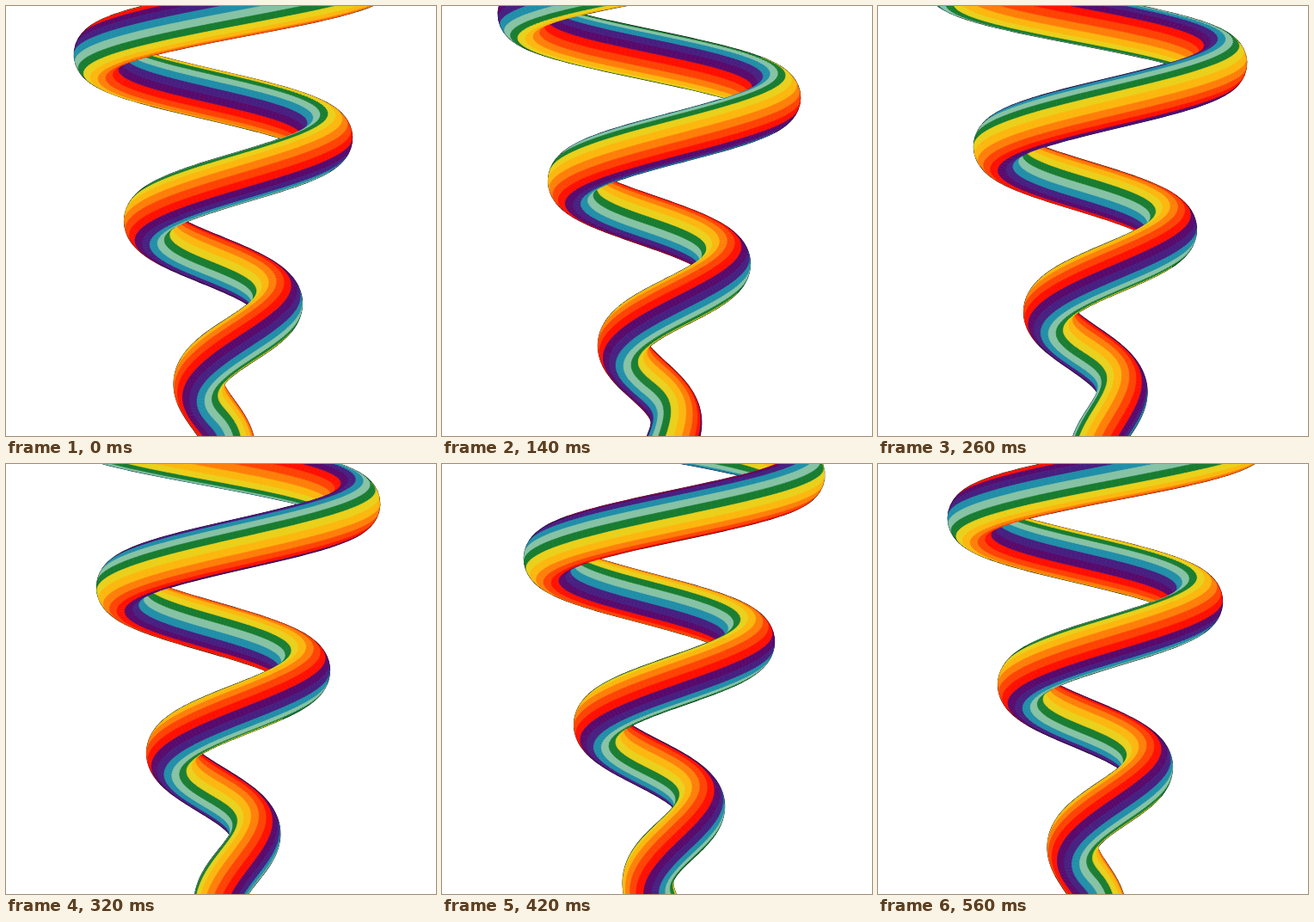
Recreate the animation shown at these times as an HTML page with a canvas. Size 500x500 px, loop 580 ms.

```html
<!DOCTYPE html>
<html lang="en">
<head>
<meta charset="utf-8">
<title>Rainbow spiral</title>
<style>
  html, body { margin: 0; height: 100%; overflow: hidden; background: #fff; }
  canvas { display: block; }
</style>
</head>
<body>
<canvas id="stage" width="500" height="500"></canvas>
<script>
const ctx = document.getElementById('stage').getContext('2d');
const COLORS = ['#ff0f00', '#580a6c', '#471f80', '#208ea8', '#86c2a4',
                '#177c30', '#ead01a', '#fcb70e', '#ff7e09', '#ff4204'];
const LOOP = 580, STEP = 20;
const CENTER = 255.5, APEX = 547.5, SLOPE = 0.3;   // cone the spiral winds on
const PITCH = 195, RISE = PITCH / (2 * Math.PI);
const TUBE = 29, HALF = 5;                         // HALF: stripes on half the tube
const STRIPE = Math.PI / 10;
const FRONT_Y = 204.5, TWIST = -10.8;

const clamp = (v, lo, hi) => Math.min(hi, Math.max(lo, v));
const cross = (a, b) => [
  a[1] * b[2] - a[2] * b[1],
  a[2] * b[0] - a[0] * b[2],
  a[0] * b[1] - a[1] * b[0]
];
const unit = v => {
  const n = Math.hypot(...v);
  return v.map(c => c / n);
};

// Cross-section of the tube at height y; z points to the viewer.
function makeRing(y, phase) {
  const turn = (FRONT_Y - PITCH * phase - y) / RISE;
  const s = Math.sin(turn), c = Math.cos(turn);
  const R = SLOPE * (APEX - y), grow = SLOPE * RISE;
  const T = unit([R * c + grow * s, -RISE, grow * c - R * s]);
  const along = s * T[0] + c * T[2];
  const N = unit([s - along * T[0], -along * T[1], c - along * T[2]]);
  const B = cross(N, T);
  // The stripes follow the tube without twisting and roll half a turn per loop.
  const outer = TWIST + Math.asinh(R / RISE) / SLOPE / STRIPE - 10 * phase;
  return {
    x: CENTER + R * s, y, z: R * c, N, B, outer,
    facing: Math.atan2(B[2], N[2])
  };
}

// Screen point on the ring at stripe coordinate u, kept to the visible half.
function pointAt(ring, u) {
  const mid = ring.outer + ring.facing / STRIPE;
  const a = (clamp(u, mid - HALF, mid + HALF) - ring.outer) * STRIPE;
  const ca = TUBE * Math.cos(a), sa = TUBE * Math.sin(a);
  return [ring.x + ca * ring.N[0] + sa * ring.B[0],
          ring.y + ca * ring.N[1] + sa * ring.B[1]];
}

function trace(points) {
  ctx.beginPath();
  points.forEach(p => ctx.lineTo(...p));
}

function drawSegment([a, b]) {
  const mids = [a, b].map(r => r.outer + r.facing / STRIPE);
  const last = Math.max(...mids) + HALF;
  for (let j = Math.floor(Math.min(...mids) - HALF); j < last; j++) {
    trace([pointAt(a, j), pointAt(a, j + 1), pointAt(b, j + 1), pointAt(b, j)]);
    ctx.closePath();
    ctx.fillStyle = ctx.strokeStyle = COLORS[((j % 10) + 10) % 10];
    ctx.fill();
    ctx.stroke();
  }
}

function draw(phase) {
  ctx.clearRect(0, 0, 500, 500);
  ctx.lineJoin = 'round';
  const rings = [];
  for (let y = 546; y > -60; y -= 1.5) {
    const ring = makeRing(y, phase), prev = rings[rings.length - 1];
    if (prev) {
      const full = 2 * Math.PI;
      ring.facing += full * Math.round((prev.facing - ring.facing) / full);
    }
    rings.push(ring);
  }

  // Hairline edge, left visible only against the background.
  ctx.strokeStyle = '#000';
  ctx.lineWidth = 1.7;
  for (const side of [-1e4, 1e4]) {
    trace(rings.map(r => pointAt(r, side)));
    ctx.stroke();
  }

  ctx.lineWidth = 0.7;
  rings.slice(1).map((r, i) => [rings[i], r])
    .sort((p, q) => p[0].z + p[1].z - q[0].z - q[1].z)
    .forEach(drawSegment);
}

const start = performance.now();
let shown = -1;
function tick() {
  const step = Math.floor((performance.now() - start) % LOOP / STEP);
  if (step !== shown) draw(step * STEP / LOOP);
  shown = step;
  requestAnimationFrame(tick);
}
tick();
</script>
</body>
</html>
```
